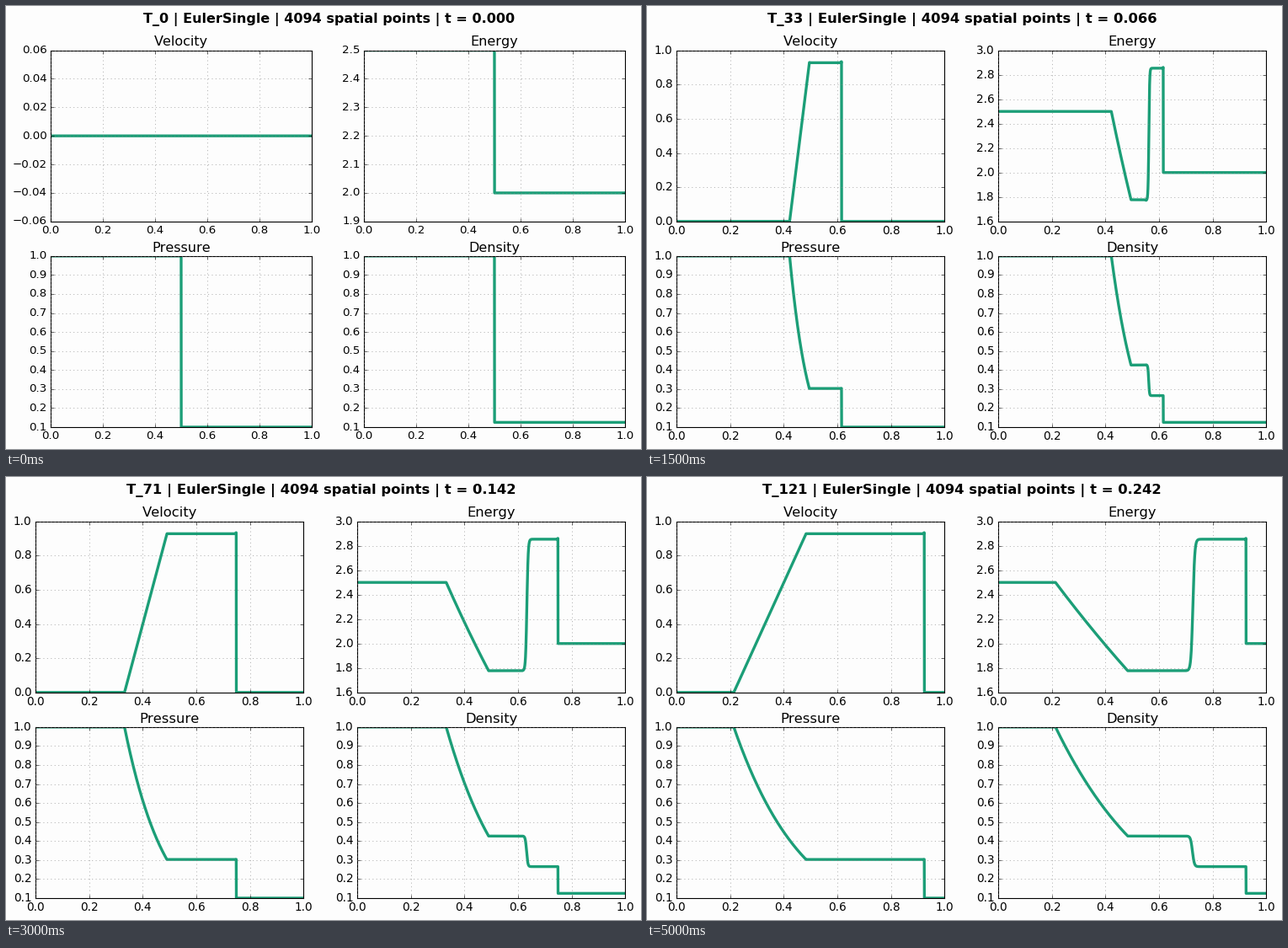
A matplotlib script for the animation above (5250 ms loop, 754x526 px).

```python
import numpy as np
import matplotlib.pyplot as plt
from matplotlib.animation import FuncAnimation

W, H, DPI = 754, 526, 64
FRAMES, INTERVAL = 21, 250
PAPER, LINE, GRID = "#fdfdfd", "#1b9e77", "#808080"


def px(n):
    """Pixels to points."""
    return n * 72 / DPI


plt.rcParams.update({
    "font.family": "DejaVu Sans",
    "text.hinting": "force_autohint",
    "text.kerning_factor": 6,
    "axes.axisbelow": False,
    "axes.linewidth": px(1.1),
    "lines.scale_dashes": False,
    "ytick.alignment": "center",
})

# Shock tube states for gamma = 1.4
G = 1.4
P_MID, U_MID, RHO_L, RHO_R = 0.30313, 0.92745, 0.42632, 0.26557
C0 = np.sqrt(G)
TAIL, SHOCK = -0.07027, 1.75216
X = np.linspace(0, 1, 4094)


def bump(center, width):
    return np.exp(-((X - center) / width) ** 2)


def solve(t):
    """Velocity, energy, pressure and density along the tube at time t."""
    if t == 0:
        left = X < 0.5
        u = np.zeros_like(X)
        p, rho = np.where(left, 1, 0.1), np.where(left, 1, 0.125)
    else:
        xi = (X - 0.5) / t
        u_fan = 2 / (G + 1) * (C0 + np.clip(xi, -C0, TAIL))
        c = 1 - (G - 1) / 2 * u_fan / C0
        contact = 0.5 + U_MID * t
        w = 0.0155 * (t / 0.242) ** 0.7
        start = np.exp(-t / 0.03)
        mix = 0.5 + 0.5 * np.tanh(2.2 * (X - contact) / w)
        rho_mid = RHO_L + (RHO_R - RHO_L) * mix
        rho_mid = rho_mid + 0.012 * start * bump(contact - 1.5 * w, 0.5 * w)

        fan, ahead = xi < TAIL, xi > SHOCK
        edge = ~ahead & (X > 0.4988 + SHOCK * t)
        u = np.where(fan, u_fan, np.where(ahead, 0, U_MID))
        u = u + 0.006 * edge + 0.012 * start * bump(0.5 + TAIL * t, 0.002)
        p = np.where(fan, c ** (2 * G / (G - 1)), np.where(ahead, 0.1, P_MID))
        p = p + 0.0007 * edge
        rho = np.where(fan, c ** (2 / (G - 1)), np.where(ahead, 0.125, rho_mid))
    return u, p / ((G - 1) * rho), p, rho


fig = plt.figure(figsize=(W / DPI, H / DPI), dpi=DPI, facecolor=PAPER)
heading = fig.text(0.5, 1 - 20 / H, "", ha="center", va="baseline", weight="bold")

NAMES = ["Velocity", "Energy", "Pressure", "Density"]
panels = []
for name in NAMES:
    ax = fig.add_axes([0, 0, 1, 1], label=name, facecolor=PAPER)
    ax.set_xlim(0, 1)
    ax.set_title(name, pad=px(5.2))
    ax.tick_params(direction="in", top=True, right=True, length=px(4.44),
                   width=px(0.56), pad=px(4.44))
    ax.grid(True, color=GRID, linewidth=px(0.56),
            linestyle=(0, (px(1.11), px(3.33))))
    curve, = ax.plot([], [], color=LINE, lw=px(3.33))
    panels.append((ax, curve))

# (low, high, step, decimals) for each panel
TENTHS = (0.1, 1.0, 0.1, 1)
FIRST = [(-0.06, 0.06, 0.02, 2), (1.9, 2.5, 0.1, 1), TENTHS, TENTHS]
LATER = [(0, 1, 0.2, 1), (1.6, 3.0, 0.2, 1), TENTHS, TENTHS]


def ticks(low, high, step, decimals):
    values = np.linspace(low, high, round((high - low) / step) + 1).round(decimals)
    labels = [f"{v + 0:.{decimals}f}".replace("-", "\u2212") for v in values]
    return values, labels


def layout(first):
    lefts, width = ((53, 425), 310) if first else ((35, 417), 318.4)
    scale = 1 if first else W / 734
    heading.set_x((383.5 if first else 374) / W)
    heading.set_fontsize(px(16 * scale))
    for k, (ax, _) in enumerate(panels):
        bottom = H - (255.8, 500)[k // 2]
        ax.set_position([lefts[k % 2] / W, bottom / H, width / W, 203.2 / H])
        spec = (FIRST if first else LATER)[k]
        ax.set_xticks(*ticks(0, 1, 0.2, 1))
        ax.set_yticks(*ticks(*spec))
        ax.set_ylim(spec[0], spec[1])
        ax.title.set_fontsize(px(16 * scale))
        ax.tick_params(labelsize=px(13.33 * scale))


def draw(i):
    step = max(0, int(6.25 * i) - 4)
    t = 0.002 * step
    layout(step == 0)
    heading.set_text(f"T_{step} | EulerSingle | 4094 spatial points | t = {t:.3f}")
    for (_, curve), y in zip(panels, solve(t)):
        curve.set_data(X, y)
    return []


anim = FuncAnimation(fig, draw, frames=FRAMES, interval=INTERVAL,
                     repeat=True, blit=False)
plt.show()
```
